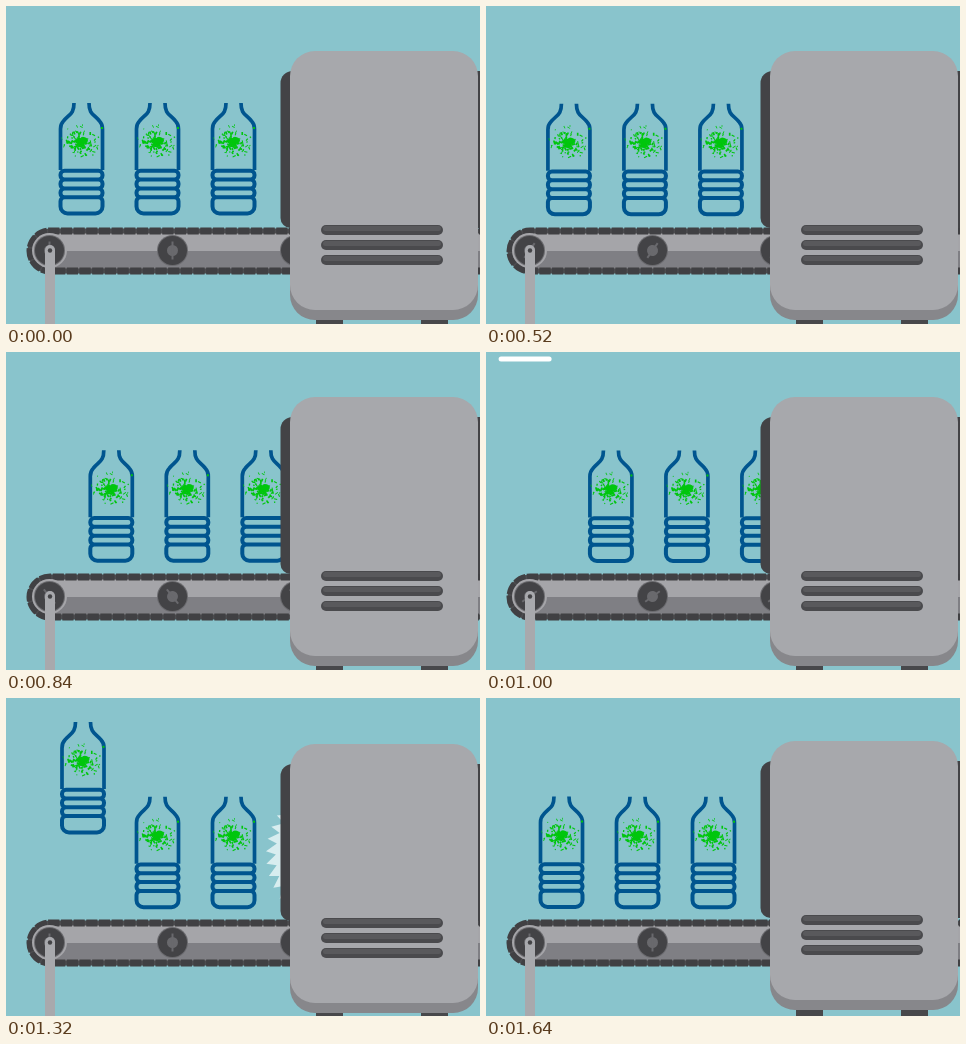
Recreate the animation shown at these times as an HTML page with a canvas. Size 474 px wide and 318 px high, loop 1680 ms.

```html
<!DOCTYPE html>
<html lang="en">
<head>
<meta charset="utf-8">
<title>Bottle conveyor</title>
<style>
html, body { margin: 0; width: 100%; height: 100%; overflow: hidden; background: #89c4cc; }
canvas { display: block; width: 474px; height: 318px; }
</style>
</head>
<body>
<canvas id="stage" width="474" height="318"></canvas>
<script>
const ctx = document.getElementById('stage').getContext('2d');
const LOOP = 1680, STEP = 40, TAU = Math.PI * 2;
const FIRST_X = 75.5, PITCH = 76;

// Progress from 0 to 1 between two times
const span = (t, from, to) => Math.min(1, Math.max(0, (t - from) / (to - from)));

function box(x, y, w, h, r, fill) {
  ctx.beginPath();
  ctx.roundRect(x, y, w, h, r);
  ctx.fillStyle = fill;
  ctx.fill();
}

function disc(x, y, r, fill) {
  ctx.beginPath();
  ctx.arc(x, y, r, 0, TAU);
  ctx.fillStyle = fill;
  ctx.fill();
}

// Draw in a shifted, optionally rotated frame
function place(x, y, turn, paint) {
  ctx.save();
  ctx.translate(x, y);
  ctx.rotate(turn);
  paint();
  ctx.restore();
}

let seed = 29;
const rand = () => (seed = (seed * 16807) % 2147483647) / 2147483647;
const specks = Array.from({ length: 130 }, () => {
  const a = rand() * TAU, r = 20 * Math.pow(rand(), 1.4);
  const size = 1.4 - r / 30;
  return {
    x: Math.cos(a) * r, y: Math.sin(a) * r * 0.9, turn: rand() * 3,
    w: size * (1 + rand() * 3), h: size * (0.8 + rand())
  };
});

function splatter() {
  ctx.fillStyle = '#00c60e';
  for (const s of specks) {
    place(s.x, s.y, s.turn, () => ctx.fillRect(-s.w / 2, -s.h / 2, s.w, s.h));
  }
  ctx.beginPath();
  ctx.ellipse(4, -2, 4, 3, 0.3, 0, TAU);
  ctx.fill();
  ctx.fillRect(21, -15, 2, 2);
}

function bottle(x, y) {
  place(x, y, 0, () => {
    ctx.beginPath();
    for (const side of [-1, 1]) {
      ctx.moveTo(side * 7.5, 97);
      ctx.bezierCurveTo(side * 7.5, 108, side * 12, 108, side * 18, 115);
      ctx.quadraticCurveTo(side * 21, 118, side * 21, 123);
      ctx.lineTo(side * 21, 164);
    }
    ctx.strokeStyle = '#00558f';
    ctx.lineWidth = 3.7;
    ctx.stroke();

    ctx.beginPath();
    for (let i = 0; i < 3; i++) ctx.roundRect(-21, 164.8 + i * 8.8, 42, 8.8, 4);
    ctx.roundRect(-21, 191.2, 42, 16.3, [4, 4, 7, 7]);
    ctx.lineWidth = 4;
    ctx.stroke();
    place(-1.5, 136, 0, splatter);
  });
}

function roller(x, turn) {
  disc(x, 244.5, 15.5, '#6b6b6f');
  disc(x, 244.5, 14.5, '#434346');
  place(x, 244.5, turn, () => {
    disc(0, 0, 5.5, '#69696d');
    ctx.fillRect(-9, -1, 18, 2);
  });
}

function conveyor(d) {
  box(24, 227, 480, 36, 18, '#7f7f84');
  box(24, 227, 480, 18, [18, 0, 0, 0], '#a5a5a9');
  ctx.beginPath();
  ctx.moveTo(490, 265);
  ctx.lineTo(44, 265);
  ctx.arc(44, 245, 20, Math.PI / 2, Math.PI * 1.5);
  ctx.lineTo(490, 225);
  ctx.strokeStyle = '#4c4c4f';
  ctx.lineWidth = 5;
  ctx.stroke();
  ctx.strokeStyle = '#404043';
  ctx.lineWidth = 7;
  ctx.setLineDash([11.2, PITCH / 6 - 11.2]);
  ctx.lineDashOffset = -d;
  ctx.stroke();
  ctx.setLineDash([]);

  disc(43.5, 244.5, 17.5, '#a5a5a9');
  for (let i = 0; i < 3; i++) roller(43.5 + i * 123, Math.PI / 2 + d / PITCH * TAU);
  box(39, 239, 10, 90, 5, '#a8a9ad');
  disc(44, 244.5, 2.2, '#434346');
}

function saw(out, turn) {
  if (out <= 0) return;
  const teeth = 38, R = 76;
  place(275 + R - out, 157, turn, () => {
    ctx.beginPath();
    for (let i = 0; i < teeth; i++) {
      const a = i / teeth * TAU, b = a + TAU / teeth * 0.75;
      ctx.lineTo(Math.cos(a) * R, Math.sin(a) * R);
      ctx.lineTo(Math.cos(b) * (R - 10), Math.sin(b) * (R - 10));
    }
    ctx.fillStyle = '#d8edef';
    ctx.fill();
  });
}

function machine() {
  box(274.5, 65, 24, 157, [12, 0, 0, 10], '#434346');
  box(460, 65, 24, 157, 8, '#434346');
  box(310, 306, 27, 20, 0, '#48484b');
  box(415, 306, 27, 20, 0, '#48484b');
  box(284, 80, 188, 234, 25, '#87878b');
  box(284, 45, 188, 259, 25, '#a7a8ac');
  for (let i = 0; i < 3; i++) {
    box(315, 219 + i * 15, 122, 10, 5, '#4a4a4d');
    box(317, 220 + i * 15, 118, 5, 2.5, '#59595c');
  }
}

function draw(t) {
  ctx.fillStyle = '#89c4cc';
  ctx.fillRect(0, 0, 474, 318);

  const slide = PITCH * Math.pow(span(t, 0, 1160), 2.9);
  const sag = 1.7 * span(t, 0, 1160);
  const nudge = t >= 200 && t < 400 ? 1 : 0;
  const shake = t > 1160 ? Math.round(2 * Math.sin((t - 1160) / 400 * 3 * TAU) - 0.5) : 0;

  place(nudge, 0, 0, () => {
    conveyor(slide);
    saw(20 * Math.sin(Math.PI * span(t, 1200, 1640)), -t / 90);
    for (let i = 0; i < 3; i++) {
      const x = FIRST_X + i * PITCH + slide;
      if (x < 300) bottle(x, sag);
    }
  });

  // A new bottle glides out of the slot, hangs, then falls onto the belt
  if (t > 980) {
    const glide = Math.pow(1 - span(t, 980, 1440), 3);
    const fall = Math.pow(span(t, 1440, 1640), 2);
    ctx.save();
    ctx.beginPath();
    ctx.rect(0, 9, 474, 309);
    ctx.clip();
    bottle(79 - 3.5 * span(t, 1160, 1440), -70 - 176 * glide + 71.5 * fall);
    ctx.restore();
  }
  const w = 53 * (span(t, 920, 1000) - span(t, 1160, 1320));
  if (w > 1) box(1 + 58 * span(t, 960, 1160) + 26 * span(t, 1160, 1320), 4.5, w, 5, 2.5, '#fff');

  place(nudge, shake, 0, machine);
}

const start = performance.now();
function tick() {
  const t = (performance.now() - start) % LOOP;
  draw(Math.floor(t / STEP) * STEP);
  requestAnimationFrame(tick);
}
draw(0);
requestAnimationFrame(tick);
</script>
</body>
</html>
```
